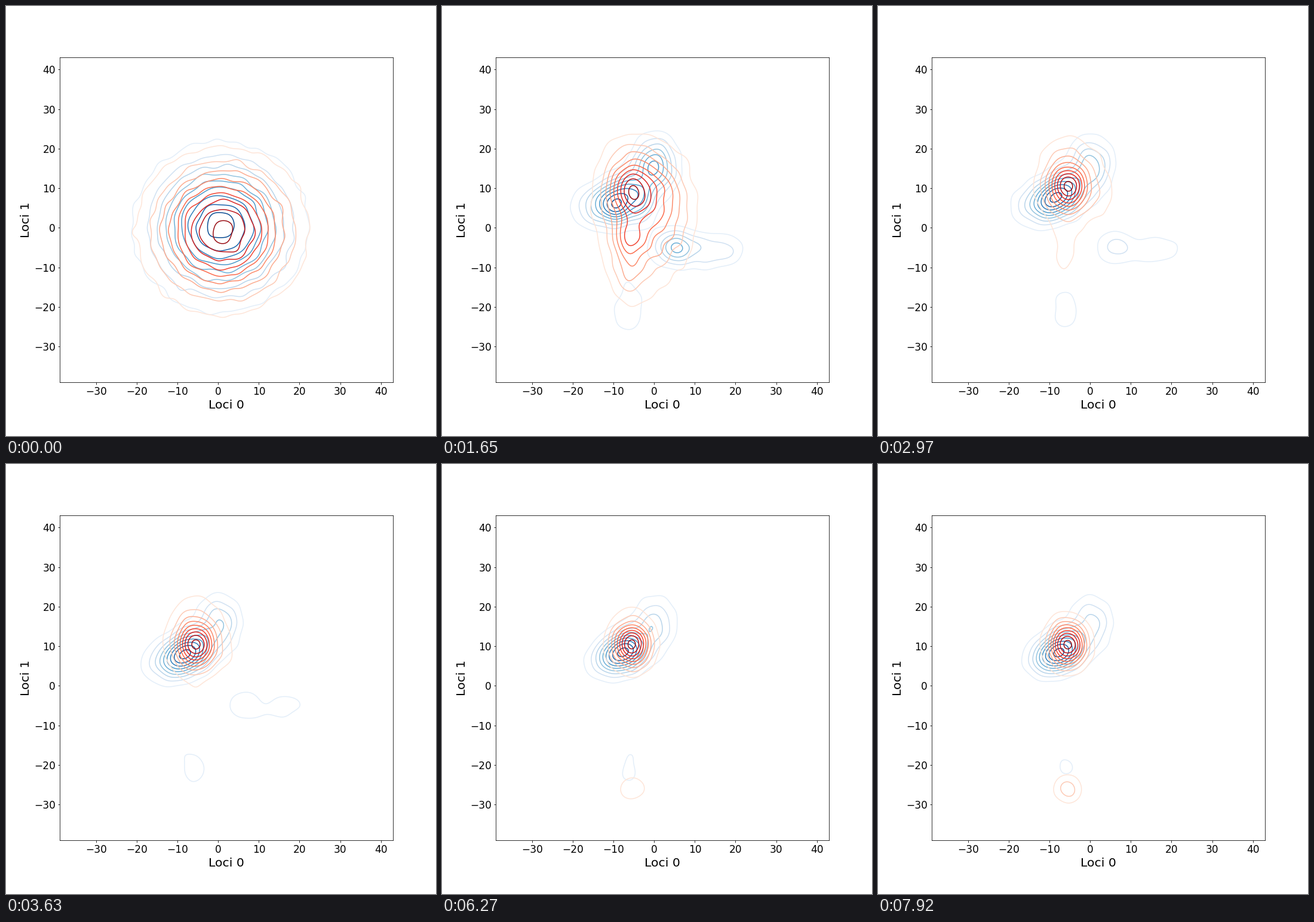
Recreate the animation shown at these times as a matplotlib script. Size 720x720 px, loop 8000 ms.

```python
import matplotlib.pyplot as plt
import numpy as np
from matplotlib.animation import FuncAnimation

HOLD, LOOP, INTERVAL = 330, 8000, 40      # ms
STEPS = LOOP // HOLD + 1
START = 3                                 # step at which hill heights are given
LEVELS = 9

X, Y = np.meshgrid(np.linspace(-30, 32, 160), np.linspace(-34, 32, 170))


def bump(x, y, sx, sy):
    return np.exp(-0.5 * (((X - x) / sx) ** 2 + ((Y - y) / sy) ** 2))


def hill(x, y, sx, sy, lasting, fading=0, half_life=1):
    """Fitness hill: one part of its crowd stays, the other dies out."""
    shape = bump(x, y, sx, sy)
    return lambda step: shape * (
        lasting + fading * 0.5 ** ((step - START) / half_life))


class Population:
    """Starts as one round cloud, then gathers on its hills."""

    def __init__(self, cmap, cloud, hills, seed):
        self.colors = plt.get_cmap(cmap)(np.arange(1, LEVELS + 1) / (LEVELS + 1))
        self.cloud = bump(*cloud)
        self.hills = hills
        self.seed = seed

    def ripple(self, step, waves=40):
        """Smooth drifting random field with unit spread."""
        rng = np.random.default_rng(self.seed)
        field = np.zeros_like(X)
        for _ in range(waves):
            angle, phase = rng.uniform(0, 2 * np.pi, 2)
            k = 2 * np.pi / rng.uniform(4.5, 9)
            along = X * np.cos(angle) + Y * np.sin(angle)
            field += np.cos(k * along + phase + 0.5 * step)
        return field / field.std()

    def density(self, step):
        gathered = sum(h(step) for h in self.hills)
        cloud = np.exp(-1.5 * step)
        z = cloud * self.cloud + (1 - cloud) * gathered / gathered.max()
        z /= z.max()
        rough = 0.027 * np.sqrt((1.05 - z) / (z + 0.05))
        z *= np.exp(rough * self.ripple(step))
        return z / z.max()

    def draw(self, ax, step):
        levels = np.arange(1, LEVELS + 1) / (LEVELS + 0.4)
        return ax.contour(X, Y, self.density(step), levels=levels,
                          colors=self.colors, linewidths=1.5)


blue = Population("Blues", (0.6, 0.3, 10.2, 10.2), [
    hill(-6.5, 9.3, 3.4, 3.4, 0.3),
    hill(-10.3, 7, 3.2, 2.9, 0.17),
    hill(0.2, 15.6, 3.5, 4.7, 0.14, 0.45, 2.5),
    hill(-13, 5.3, 4.6, 3.8, 0.02, 0.33, 4),
    hill(-9, 4.3, 2.4, 2.4, 0, 0.38, 2),
    hill(-3, 5.5, 2.2, 3.4, 0, 0.6, 1.2),
    hill(4.5, -4.8, 2.9, 2.9, 0, 0.58, 1.6),
    hill(7, -5, 3, 3, 0, 0.13, 8),
    hill(13, -6.2, 4.2, 3.2, 0, 0.28, 1.6),
    hill(17.5, -5.3, 4.5, 3.1, 0, 0.1, 10),
    hill(-6.3, -20.8, 3.1, 4.8, 0.045, 0.11, 3),
    hill(-3, -7, 5, 5, 0, 0.15, 1),
], seed=4)

red = Population("Reds", (1.1, -0.8, 10.1, 10.1), [
    hill(-5.6, 10.4, 3.1, 3.7, 0.1),
    hill(-5.5, 11, 5, 5.8, 0, 0.14, 4),
    hill(-2, 2.5, 7.2, 10, 0, 0.85, 0.8),
    hill(-4.6, 7, 2.4, 2.4, 0, 0.15, 0.8),
    hill(-5.5, -2.3, 2.8, 2.2, 0, 0.25, 0.8),
    hill(-5, -14, 5, 6, 0, 0.12, 0.8),
    hill(-6.3, -6, 2.3, 7, 0, 0.144, 2),
    hill(-6, 20, 4.5, 3.2, 0, 0.03, 6),
    hill(3, 9, 3.5, 6, 0, 0.09, 2),
    hill(-5.5, -26, 2.7, 2.7, 0, 0.0078, -12),
], seed=7)

plt.rcParams["font.family"] = "DejaVu Sans"
fig = plt.figure(figsize=(10, 10), dpi=72, facecolor="white")
ax = fig.add_axes([0.125, 0.125, 0.775, 0.755])

snapshots = [[p.draw(ax, step) for p in (blue, red)] for step in range(STEPS)]

ax.set(xlim=(-39, 43), ylim=(-39, 43),
       xticks=range(-30, 41, 10), yticks=range(-30, 41, 10))
ax.tick_params(labelsize=17)
ax.set_xlabel("Loci 0", fontsize=20.4)
ax.set_ylabel("Loci 1", fontsize=20.4)


def update(frame):
    now = ((frame + 1) * INTERVAL - 1) // HOLD
    for step, sets in enumerate(snapshots):
        for contours in sets:
            contours.set_visible(step == now)
    return snapshots[now]


anim = FuncAnimation(fig, update, frames=LOOP // INTERVAL, interval=INTERVAL,
                     init_func=lambda: update(0), repeat=True, repeat_delay=0)
plt.show()
```
